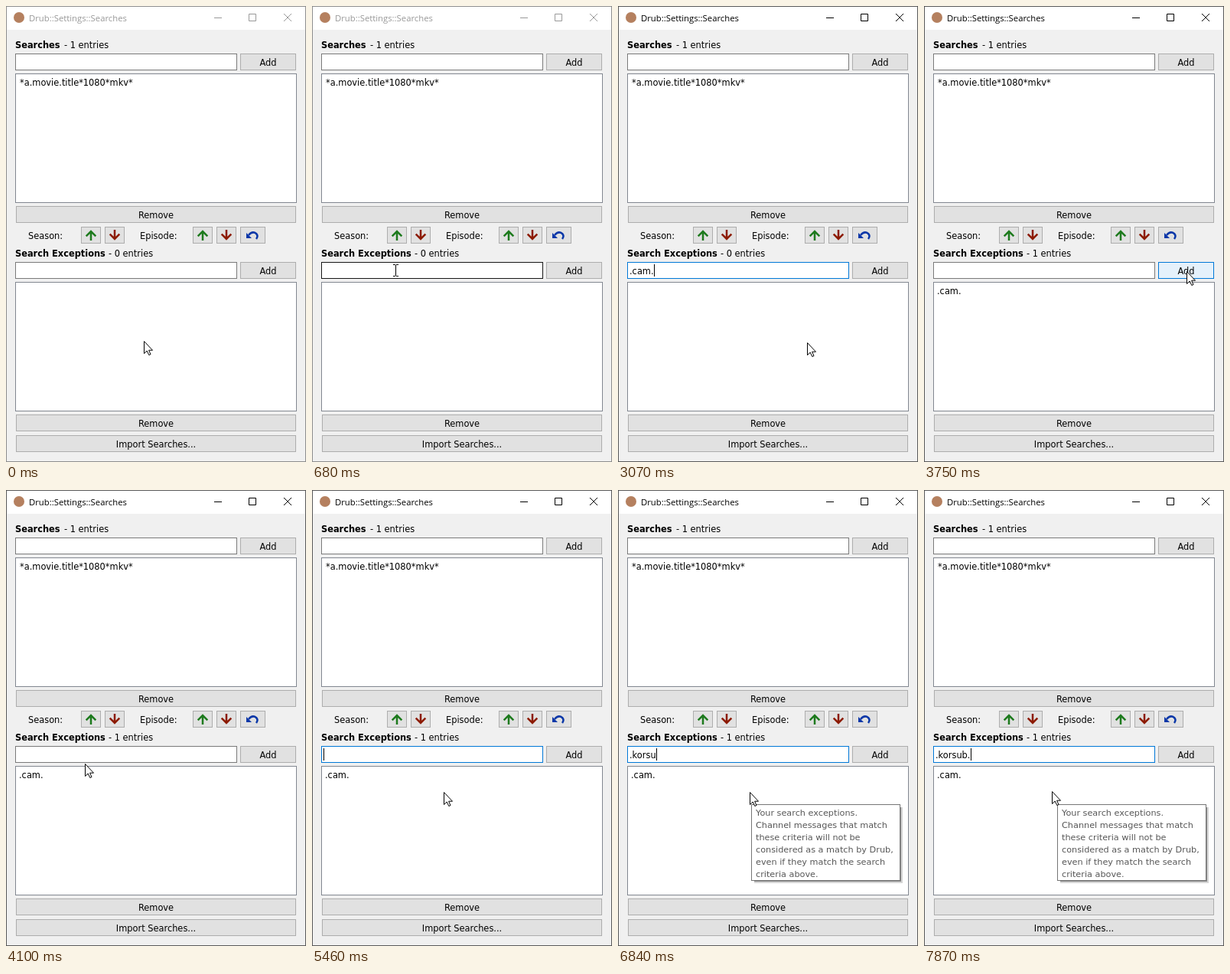
Write an HTML page that moves like this. It is 392 by 595 pixels and loops after 8 s.

```html
<!DOCTYPE html>
<html lang="en">
<head>
<meta charset="utf-8">
<title>Search settings</title>
<style>
html, body { margin: 0; width: 100%; height: 100%; overflow: hidden; background: #f0f0f0; }
svg { display: block; width: 392px; height: 595px; }
text { font: 11.4px "DejaVu Sans", Verdana, sans-serif; fill: #000; white-space: pre; }
.bold { font-weight: bold; }
.mid { text-anchor: middle; }
#caption { font: 11.3px "Open Sans", "Noto Sans", sans-serif; }
#tip text { font-size: 11.25px; fill: #575757; }
.field { fill: #fff; stroke: #7a7a7a; }
.list { fill: #fff; stroke: #828790; }
.button { fill: #e1e1e1; stroke: #adadad; }
.line { fill: none; stroke: #000; }
.icon { fill: none; stroke-width: 2.5; }
.hover { stroke: #171717; }
.focus { stroke: #0078d7; }
.hot { fill: #e5f1fb; stroke: #0078d7; }
.pressed { fill: #cce4f7; stroke: #005499; }
</style>
</head>
<body>
<svg id="stage" viewBox="0 0 392 595" xmlns="http://www.w3.org/2000/svg"></svg>
<script>
const NS = 'http://www.w3.org/2000/svg';
const stage = document.getElementById('stage');
const LOOP = 8000;

function add(tag, attrs, parent = stage) {
  const el = document.createElementNS(NS, tag);
  for (const key in attrs) el.setAttribute(key, attrs[key]);
  parent.append(el);
  return el;
}

// Box with a crisp one-pixel border; x, y, w, h are its outer edges.
const box = (cls, x, y, w, h, parent) =>
  add('rect', { class: cls, x: x + .5, y: y + .5, width: w - 1, height: h - 1 }, parent);

function label(str, x, y, cls = '', parent) {
  const el = add('text', { x, y, class: cls }, parent);
  el.textContent = str;
  return el;
}

function button(str, x, y, w) {
  const el = box('button', x, y, w, 22);
  if (str) label(str, x + w / 2, y + 16, 'mid');
  return el;
}

const arrow = (x, color, turn) => {
  button('', x, 288, 26);
  add('path', {
    class: 'icon', stroke: color, d: 'M0 7V-4.5M-6.3 1.3L0-5 6.3 1.3',
    transform: `translate(${x + 13} 299) rotate(${turn})`
  });
};

// Window frame and title bar
add('rect', { width: 392, height: 595, fill: '#f0f0f0' });
add('rect', { width: 392, height: 31, fill: '#fff' });
const frame = box('line', 0, 0, 392, 595);
add('circle', { cx: 17, cy: 15, r: 7, fill: '#b5805f' });
const caption = label('Drub::Settings::Searches', 30, 20);
caption.id = 'caption';
const controls = add('path', {
  class: 'line', d: 'M272 15.5h10M317.5 10.5h9v9h-9zM363 10l10 10M373 10l-10 10'
});

// Upper group
label('Searches', 12, 55, 'bold');
label('- 1 entries', 76, 55);
box('field', 12, 62, 290, 22);
button('Add', 306, 62, 73);
box('list', 12, 88, 368, 169);
label('*a.movie.title*1080*mkv*', 18, 104);
button('Remove', 13, 261, 366);

label('Season:', 29, 304);
label('Episode:', 175, 304);
for (const x of [98, 244]) {
  arrow(x, '#1d7a1d', 0);
  arrow(x + 31, '#8c1a00', 180);
}
button('', 306, 288, 33);
add('path', { class: 'icon', stroke: '#0a37a8', 'stroke-width': 2, d: 'M317 299Q322 293 327 297Q330 300 327 304' });
add('path', { fill: '#0a37a8', d: 'M314 296v7h7z' });

// Lower group
label('Search Exceptions', 12, 327, 'bold');
const count = label('', 134, 327);
const field = box('field', 12, 334, 290, 22);
const typed = label('', 15, 350);
const caret = add('rect', { y: 337, width: 1, height: 16 });
const addButton = button('Add', 306, 334, 73);
box('list', 12, 360, 368, 169);
const item = label('.cam.', 17, 376);
button('Remove', 13, 533, 366);
button('Import Searches...', 13, 560, 366);

const tip = add('g', { id: 'tip' });
add('rect', { x: 178, y: 414, width: 194, height: 99, fill: '#000', opacity: .16 }, tip);
add('rect', { x: 178, y: 414, width: 192, height: 97, fill: '#000', opacity: .35 }, tip);
add('rect', { x: 174.5, y: 410.5, width: 194, height: 99, fill: '#fff', stroke: '#767676' }, tip);
[
  'Your search exceptions.',
  'Channel messages that match',
  'these criteria will not be',
  'considered as a match by Drub,',
  'even if they match the search',
  'criteria above.'
].forEach((str, i) => label(str, 180, 425 + 16 * i, '', tip));

const pointer = add('path', {
  fill: '#fff', stroke: '#000',
  d: 'M.5.5V16.5L4.2 13 6.8 18.5 9 17.5 6.6 12.2H11.5Z'
});
const beam = add('path', { class: 'line', d: 'M0 .5h3M4 .5h3M3.5 1v14M0 15.5h3M4 15.5h3' });

// Each step lists only what changes; caret 0 means hidden.
const steps = [
  [0, { active: false, count: 0, text: '', caret: 0, field: '', add: '', tip: false, beam: false, at: [180, 437] }],
  [330, { at: [106, 383] }],
  [680, { field: 'hover', beam: true, at: [106, 337] }],
  [1010, { active: true, caret: 15 }],
  [1360, { field: 'focus', beam: false, at: [247, 439] }],
  [1710, { text: '.', caret: 19 }],
  [2390, { text: '.cam', caret: 43 }],
  [3070, { text: '.cam.', caret: 47 }],
  [3420, { caret: 0, field: '', add: 'pressed', at: [343, 346] }],
  [3750, { text: '', count: 1, add: 'hot' }],
  [4100, { add: '', at: [103, 357] }],
  [4430, { field: 'hover', beam: true, at: [104, 338] }],
  [4780, { field: 'focus', caret: 15, beam: false, at: [167, 394] }],
  [5130, { caret: 0, at: [172, 394] }],
  [5460, { caret: 15 }],
  [5810, { text: '.', caret: 19, tip: true }],
  [6490, { text: '.kor', caret: 37 }],
  [6840, { text: '.korsu', caret: 50 }],
  [7170, { text: '.korsub', caret: 57 }],
  [7520, { caret: 0 }],
  [7870, { text: '.korsub.', caret: 61, at: [167, 393] }]
];

const show = (el, on) => el.setAttribute('visibility', on ? 'visible' : 'hidden');

function render(s) {
  const ink = s.active ? '#000' : '#999';
  frame.style.stroke = s.active ? '#5a5a5a' : '#8e8e8e';
  caption.style.fill = ink;
  controls.style.stroke = ink;
  count.textContent = `- ${s.count} entries`;
  show(item, s.count);
  typed.textContent = s.text;
  show(caret, s.caret);
  caret.setAttribute('x', s.caret);
  field.setAttribute('class', `field ${s.field}`);
  addButton.setAttribute('class', `button ${s.add}`);
  show(tip, s.tip);
  show(pointer, !s.beam);
  show(beam, s.beam);
  (s.beam ? beam : pointer).setAttribute('transform', `translate(${s.at})`);
}

const start = performance.now();
let shown = -1;

function tick() {
  const t = (performance.now() - start) % LOOP;
  const past = steps.filter(([at]) => at <= t);
  if (past.length !== shown) {
    shown = past.length;
    render(Object.assign({}, ...past.map(([, change]) => change)));
  }
  requestAnimationFrame(tick);
}
tick();
</script>
</body>
</html>
```
